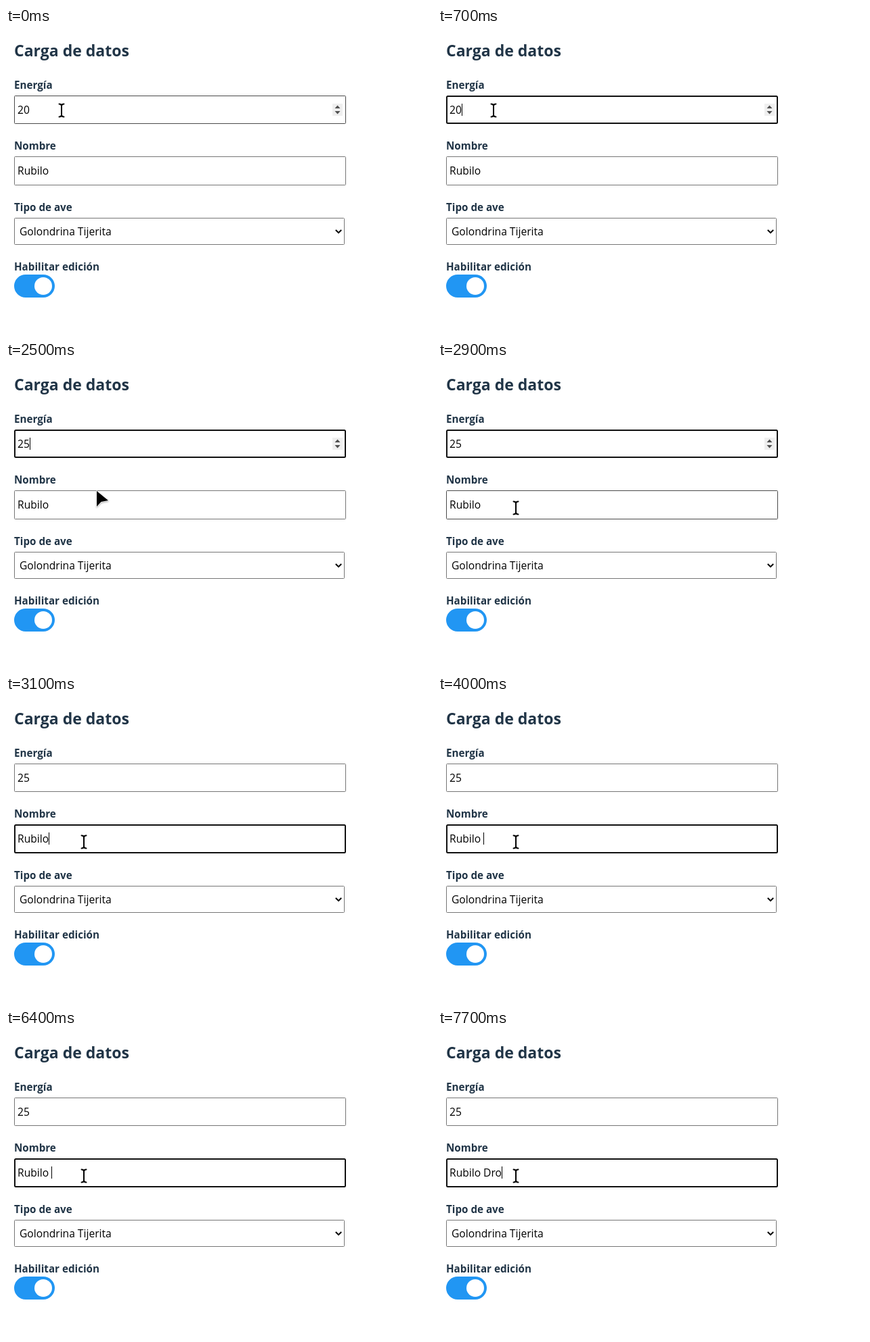
Write an HTML page that moves like this. It is 629 by 453 pixels and loops after 8 s.

```html
<!DOCTYPE html>
<html lang="es">
<head>
<meta charset="utf-8">
<title>Carga de datos</title>
<style>
  html, body { margin: 0; width: 100%; height: 100%; overflow: hidden; background: #fff; }
  svg { display: block; width: 629px; height: 453px; }
  text { font: 15.6px "Open Sans", "Noto Sans", sans-serif; fill: #000; white-space: pre; }
  .label { font-size: 15.2px; font-weight: 700; fill: #213547; }
  .title { font-size: 23px; font-weight: 700; fill: #213547; }
  .box { fill: #fff; stroke: #767676; }
</style>
</head>
<body>
<svg viewBox="0 0 629 453">
  <rect width="629" height="453" fill="#fff"/>
  <text class="title" x="12" y="42">Carga de datos</text>

  <text class="label" x="12" y="90">Energía</text>
  <rect class="box" id="energyBox"/>
  <text id="energy" x="17" y="127"></text>
  <g id="spinner">
    <rect x="482" y="112" width="15" height="18" fill="#efefef"/>
    <path d="M485.5 119L489.5 114.5L493.5 119ZM485.5 123L489.5 127.5L493.5 123Z" fill="#505050"/>
  </g>

  <text class="label" x="12" y="180">Nombre</text>
  <rect class="box" id="nameBox"/>
  <text id="name" x="17" y="217"></text>

  <text class="label" x="12" y="271">Tipo de ave</text>
  <rect class="box" x="12.5" y="281.5" width="487" height="39" rx="1"/>
  <text x="20" y="307">Golondrina Tijerita</text>
  <path d="M486.8 299L491 303.2L495.2 299" fill="none" stroke="#000" stroke-width="2"/>

  <text class="label" x="12" y="359">Habilitar edición</text>
  <rect x="12" y="365" width="60" height="34" rx="17" fill="#2196f3"/>
  <circle cx="55" cy="382" r="13" fill="#fff"/>

  <rect id="caret" width="1" height="18"/>
  <g id="beam" fill="none" stroke-linecap="round" stroke-linejoin="round">
    <path id="beamShape" stroke="#fff" stroke-width="4"
      d="M-3.5 -9.5Q-0.5 -9.5 0 -7Q0.5 -9.5 3.5 -9.5M0 -7V7M-3.5 9.5Q-0.5 9.5 0 7Q0.5 9.5 3.5 9.5"/>
    <path id="beamInk" stroke="#000" stroke-width="2"/>
  </g>
  <path id="arrow" d="M0 1V24L6.5 17L17 15Z" fill="#000" stroke="#fff" stroke-width="1.4"
    stroke-linejoin="round" paint-order="stroke" style="filter:drop-shadow(0 1px 1px #0005)"/>
</svg>
<script>
const LOOP = 8000, STEP = 100, BLINK = 600;
const $ = id => document.getElementById(id);
const set = (el, attrs) => { for (const k in attrs) el.setAttribute(k, attrs[k]); };
const show = (el, on) => set(el, { visibility: on ? 'visible' : 'hidden' });

// [time, x, y]
const mouse = [
  [0, 82, 122], [900, 82, 122], [1000, 104, 127], [1100, 152, 135], [1200, 181, 138],
  [1400, 181, 138], [1500, 182, 138], [2000, 182, 138], [2200, 177, 137], [2400, 177, 137],
  [2500, 134, 190], [2600, 126, 201], [2900, 115, 216], [LOOP, 115, 216]
];
// [time, value]
const energies = [[0, '20'], [1200, '21'], [1600, '22'], [1800, '23'], [2000, '24'], [2200, '25']];
const names = [[0, 'Rubilo'], [4000, 'Rubilo '], [7400, 'Rubilo D'], [7600, 'Rubilo Dr'], [7700, 'Rubilo Dro']];
const FOCUS_ENERGY = 700, FOCUS_NAME = 3100;

const last = (list, t) => list.filter(k => k[0] <= t).pop();

function mouseAt(t) {
  const i = mouse.findIndex(k => k[0] > t);
  const [t0, x0, y0] = mouse[i - 1], [t1, x1, y1] = mouse[i];
  const p = (t - t0) / (t1 - t0);
  return [Math.round(x0 + (x1 - x0) * p), Math.round(y0 + (y1 - y0) * p)];
}

function drawBox(el, y, h, focus, hover) {
  const w = focus ? 2 : 1;
  set(el, {
    x: 12 + w / 2, y: y + w / 2, width: 490 - w, height: h - w, rx: focus ? 1.5 : 1,
    style: `stroke-width:${w};stroke:${focus ? '#101010' : hover ? '#4a4a4a' : '#767676'}`
  });
}

function draw(ms) {
  const t = Math.floor(ms / STEP) * STEP;
  const onEnergy = t >= FOCUS_ENERGY && t < FOCUS_NAME, onName = t >= FOCUS_NAME;
  const [x, y] = mouseAt(t);
  const isArrow = y > 142 && y <= 190;
  const overEnergy = y <= 142, overName = y > 190;
  const energy = last(energies, t), name = last(names, t);

  drawBox($('energyBox'), 100, 42, onEnergy, overEnergy);
  drawBox($('nameBox'), 190, 43, onName, overName);
  $('energy').textContent = energy[1];
  $('name').textContent = name[1];
  show($('spinner'), onEnergy || overEnergy);

  const field = onName ? $('name') : $('energy');
  const since = onName ? Math.max(FOCUS_NAME, name[0]) : Math.max(FOCUS_ENERGY, energy[0]);
  const lit = Math.floor((t - since) / BLINK) % 2 === 0;
  show($('caret'), (onEnergy || onName) && lit);
  set($('caret'), { x: Math.round(17 + field.getComputedTextLength()), y: onName ? 202 : 112 });

  const at = { transform: `translate(${x} ${y})` };
  set($('beam'), at);
  set($('arrow'), at);
  show($('beam'), !isArrow);
  show($('arrow'), isArrow);
}

set($('beamInk'), { d: $('beamShape').getAttribute('d') });
const start = performance.now();
function tick() {
  draw((performance.now() - start) % LOOP);
  requestAnimationFrame(tick);
}
tick();
</script>
</body>
</html>
```
